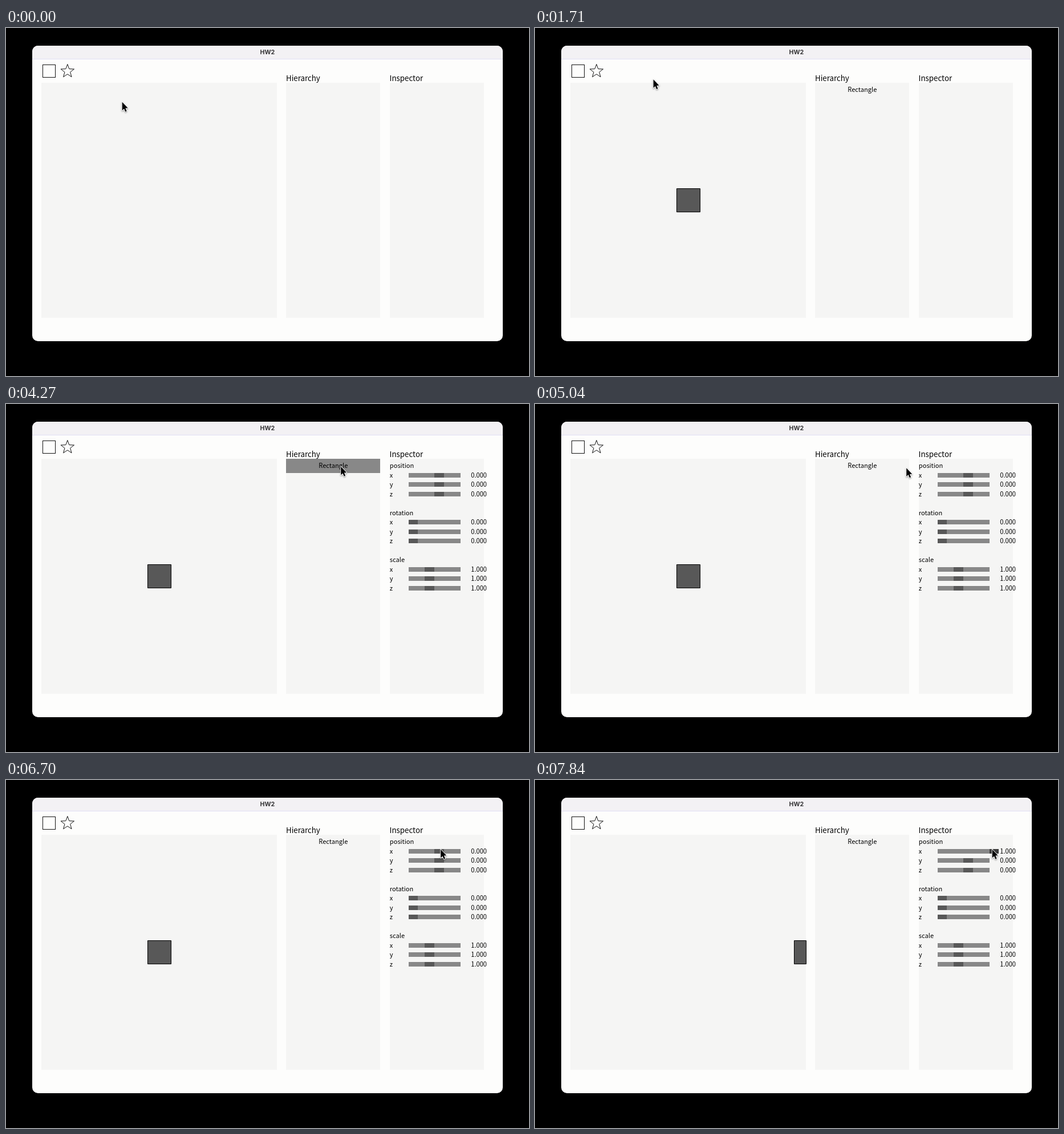
These frames come from a looping animation (917x610 px, 8 s). An HTML page with a canvas:

```html
<!DOCTYPE html>
<html lang="en">
<head>
<meta charset="utf-8">
<title>HW2</title>
<style>
html, body { margin: 0; width: 100%; height: 100%; overflow: hidden; background: #000; }
canvas { display: block; }
</style>
</head>
<body>
<canvas id="stage" width="917" height="610"></canvas>
<script>
const ctx = document.getElementById('stage').getContext('2d');
const LOOP = 8000;
const S = 0.825;                       // app units to stage pixels
const X = u => 45.9 + u * S;
const Y = u => 54.5 + u * S;
const SANS = '"Noto Sans CJK JP", "Noto Sans CJK SC", "Noto Sans", sans-serif';
const BIG = 13.3, SMALL = 11.08;

const CREATE = 1210, SELECT = 4140, RELEASE = 4340, GRAB = 6850;

// pointer moves: start, end, and the tip position reached
const moves = [
  [30, 750, 91.5, 79.5],
  [870, 1050, 73.5, 76],
  [1300, 2560, 609.5, 130],
  [2760, 3080, 595.5, 121],
  [3280, 3700, 587, 109],
  [4350, 5930, 744.5, 115],
  [5930, 6540, 762, 121],
  [GRAB, 7210, 780, 121],
  [7210, 7840, 801.5, 121]
];

function pointer(t) {
  let x = 203.5, y = 129;
  for (const [from, to, tx, ty] of moves) {
    const k = Math.min(1, Math.max(0, (t - from) / (to - from)));
    const e = from < GRAB ? k * k * (3 - 2 * k) : k;
    x += (tx - x) * e;
    y += (ty - y) * e;
  }
  return [x, y];
}

function box(left, top, right, bottom, color) {
  const [l, t, r, b] = [left, top, right, bottom].map(Math.round);
  ctx.fillStyle = color;
  ctx.fillRect(l, t, r - l, b - t);
}

// rectangle given in app units
function panel(x, y, w, h, color) {
  box(X(x), Y(y), X(x + w), Y(y + h), color);
}

function text(str, x, y, size, align = 'left') {
  ctx.font = `${size}px ${SANS}`;
  ctx.textAlign = align;
  ctx.fillStyle = '#000';
  ctx.fillText(str, x, Math.round(y));
}

function poly(points) {
  ctx.beginPath();
  points.forEach(([x, y]) => ctx.lineTo(x, y));
  ctx.closePath();
}

function drawWindow() {
  box(0, 0, 917, 610, '#000');
  ctx.save();
  ctx.beginPath();
  ctx.roundRect(46, 31, 825, 518, 10);
  ctx.clip();
  box(46, 31, 871, 549, '#fdfdfc');
  box(46, 31, 871, 54, '#f3f1f4');
  box(46, 54, 871, 55, '#e2dff5');
  ctx.restore();

  ctx.font = '700 10.7px Inter, sans-serif';
  ctx.textAlign = 'center';
  ctx.fillStyle = '#363537';
  ctx.fillText('HW2', 458.3, 46);

  panel(20, 50, 500, 500, '#f5f5f4');
  panel(540, 50, 200, 500, '#f5f5f4');
  panel(760, 50, 200, 500, '#f5f5f4');
  text('Hierarchy', 491, 93, BIG);
  text('Inspector', 672.6, 93, BIG);

  ctx.strokeStyle = '#111';
  ctx.lineWidth = 1;
  ctx.strokeRect(64.5, 64.5, 22, 22);
  poly(Array.from({ length: 10 }, (_, i) => {
    const r = i % 2 ? 5.1 : 12.3, a = i * Math.PI / 5;
    return [107.8 + r * Math.sin(a), 75.8 - r * Math.cos(a)];
  }));
  ctx.stroke();
}

function drawSquare(v) {
  const left = Math.round(X(245 + 250 * v)) + 0.5;
  const right = Math.min(left + 41, 475.5);
  ctx.fillStyle = '#585858';
  ctx.strokeStyle = '#000';
  ctx.beginPath();
  ctx.rect(left, 281.5, right - left, 41);
  ctx.fill();
  ctx.stroke();
}

function drawGroup(name, top, values, min, max, held) {
  text(name, 672.8, Y(top) - 8.4, SMALL);
  values.forEach((v, i) => {
    const row = top + 20 * i;
    const knob = 800 + 110 * (v - min) / (max - min);
    panel(800, row, 110, 10, '#888');
    panel(knob, row, 20, 10, held && i === 0 ? '#3c3c3c' : '#585858');
    text('xyz'[i], 672.8, Y(row) + 8.4, SMALL);
    text(v.toFixed(3), 815.3, Y(row) + 8.4, SMALL);
  });
}

function drawPointer(x, y) {
  ctx.save();
  ctx.translate(x, y);
  poly([[0.2, 0.8], [0.2, 15.6], [3.5, 12.5], [5.8, 17.7], [8.1, 16.7], [5.9, 11.6], [10.2, 11.3]]);
  ctx.lineJoin = 'round';
  ctx.shadowColor = 'rgba(0,0,0,.4)';
  ctx.shadowBlur = 2.5;
  ctx.shadowOffsetY = 1.2;
  ctx.strokeStyle = '#fff';
  ctx.lineWidth = 1.8;
  ctx.stroke();
  ctx.shadowColor = 'transparent';
  ctx.fillStyle = '#000';
  ctx.fill();
  ctx.restore();
}

function draw(t) {
  const [px, py] = pointer(t);
  const held = t >= GRAB;
  const v = held ? Math.min(1, (px - 755.22) / 45.5) : 0;

  drawWindow();
  if (t >= CREATE) {
    drawSquare(v);
    if (t >= SELECT && t < RELEASE) panel(540, 50, 200, 30, '#888');
    text('Rectangle', 573.8, 112, SMALL, 'center');
  }
  if (t >= SELECT) {
    drawGroup('position', 80, [v, 0, 0], -1, 1, held);
    drawGroup('rotation', 180, [0, 0, 0], 0, 2 * Math.PI);
    drawGroup('scale', 280, [1, 1, 1], 0.1, 3);
  }
  drawPointer(px, py);
}

const start = performance.now();
function tick() {
  draw((performance.now() - start) % LOOP);
  requestAnimationFrame(tick);
}
tick();
</script>
</body>
</html>
```
